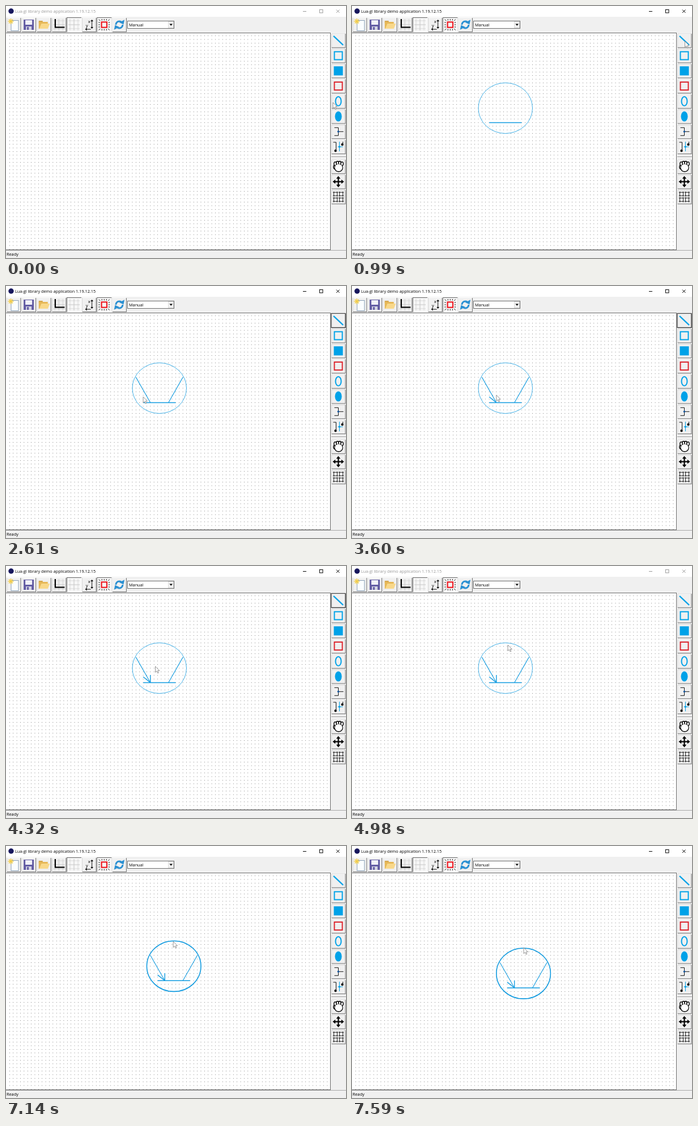
An HTML page with a canvas that plays this animation: 600x444 px, repeating every 7620 ms.

```html
<!DOCTYPE html>
<html lang="en">
<head>
<meta charset="utf-8">
<title>Drawing demo</title>
<style>
html, body { margin: 0; width: 100%; height: 100%; overflow: hidden; background: #fff; }
canvas { display: block; }
</style>
</head>
<body>
<canvas id="stage" width="600" height="444"></canvas>
<script>
const W = 600, H = 444, LOOP = 7620, GRID = 6.37, TOP = 46.2, DRAG = 200;
const BLUE = '#00a2e8', INK = '#119be0', RED = '#dc262e', FACE = '#f0f0f0', DARK = '#6c6c6c';
const view = document.getElementById('stage').getContext('2d');
let c = view;

const gridX = n => n * GRID;
const gridY = n => TOP + n * GRID;

function box(x, y, w, h, fill) {
  c.fillStyle = fill;
  c.fillRect(x, y, w, h);
}

// Square outline given by its centre and half side
function square(x, y, r, color, width) {
  c.strokeStyle = color;
  c.lineWidth = width;
  c.strokeRect(x - r, y - r, 2 * r, 2 * r);
}

function line(x0, y0, x1, y1, color = '#111', width = 1) {
  c.beginPath();
  c.moveTo(x0, y0);
  c.lineTo(x1, y1);
  c.strokeStyle = color;
  c.lineWidth = width;
  c.stroke();
}

function oval(x, y, rx, ry, fill, color, width = 1) {
  c.beginPath();
  c.ellipse(x, y, rx, ry, 0, 0, 7);
  if (fill) { c.fillStyle = fill; c.fill(); }
  if (color) { c.strokeStyle = color; c.lineWidth = width; c.stroke(); }
}

const dot = (x, y, r, fill = '#111') => oval(x, y, r, r, fill);

// Arrow head with its tip at x, y
function head(x, y, angle, size, fill = '#000') {
  at(x, y, () => {
    c.rotate(angle);
    c.beginPath();
    c.moveTo(0, 0);
    c.lineTo(-size, -size * .8);
    c.lineTo(-size, size * .8);
    c.fillStyle = fill;
    c.fill();
  });
}

function text(s, x, y, color = '#000', size = 7.3) {
  c.font = `${size}px "Open Sans", "Noto Sans", sans-serif`;
  c.fillStyle = color;
  c.fillText(s, x, y);
}

function at(x, y, draw) {
  c.save();
  c.translate(x, y);
  draw();
  c.restore();
}

function turns(n, draw) {
  for (let i = 0; i < n; i++) {
    draw();
    c.rotate(2 * Math.PI / n);
  }
}

function button(down) {
  box(-13, -13, 26, 26, down ? DARK : '#fff');
  box(-12, -12, 25, 25, down ? '#fff' : DARK);
  box(-12, -12, 24, 24, down ? '#f7f7f7' : FACE);
}

const lattice = () => turns(4, () => {
  for (const p of [0, 7]) line(p, -10, p, 10, '#ccc', .7);
});

const topIcons = [
  () => {
    box(-5, -8, 14, 19, '#8a9fb5');
    box(-4, -7, 12, 17, '#fafdff');
    at(-5, -6, () => turns(8, () => line(0, 0, 0, -5, '#f2cd48', 1.5)));
  },
  () => {
    box(-9, -9, 18, 18, '#625ca4');
    box(-6, -8, 12, 8, '#f0f0f8');
    box(-5, 3, 10, 6, '#d4d4e4');
    box(-3, 4, 3, 5, '#625ca4');
  },
  () => {
    box(-9, -7, 7, 4, '#d5a64c');
    box(-9, -5, 16, 12, '#e6b857');
    at(-8, 7, () => {
      c.transform(1, 0, -.4, 1, 0, 0);
      box(0, -9, 15, 9, '#f8d88a');
    });
  },
  () => {
    lattice();
    line(-6.5, -10, -6.5, 5.5, '#000', 2.2);
    line(-6.5, 4.5, 10, 4.5, '#000', 2.2);
  },
  lattice,
  () => {
    text('x', -2, -3, '#000', 8);
    text('y', -6, 4, '#000', 8);
    line(5, -7, 5, 5);
    head(5, -9, -Math.PI / 2, 3);
    head(5, 7, Math.PI / 2, 3);
    line(-4, 8, 3, 8);
    head(-7, 8, Math.PI, 3);
  },
  () => {
    square(0, 0, 4.7, '#ed1c24', 2.2);
    turns(4, () => {
      for (const p of [-4, 0, 4]) line(p, -10, p, -7.5);
      line(-9.5, -9.5, -7, -7);
    });
  },
  () => turns(2, () => {
    c.beginPath();
    c.arc(0, 0, 6, Math.PI, Math.PI * 1.7);
    c.strokeStyle = '#2b90d2';
    c.lineWidth = 3;
    c.stroke();
    head(7.5, -.5, 1.1, 6.5, '#2b90d2');
  })
];

const sideIcons = [
  () => line(-8.5, -8, 8.5, 8, BLUE, 2.3),
  () => square(0, 0, 7, BLUE, 2),
  () => box(-8, -8, 16, 16, BLUE),
  () => square(0, 0, 7, RED, 2),
  () => oval(0, 0, 5, 8, null, BLUE, 2),
  () => oval(0, 0, 6, 9, BLUE),
  () => {
    for (const y of [-7, 7]) line(-7, y, 0, y);
    line(0, -7, 0, 7);
    line(0, 0, 9, 0);
    dot(0, 0, 1.8, '#16579c');
  },
  () => {
    line(-9, -8, -4, -8);
    line(-4, -8, -4, 7);
    dot(-5, 7, 2.2);
    line(2, -9, 2, 8, BLUE);
    line(-1, 0, 8, 0, BLUE);
    dot(2, 0, 1.7, BLUE);
    line(8, -9, 8, -4);
    dot(7, -4, 2.2);
  },
  () => {
    oval(-6, 1, 2.5, 3.5, '#fff', '#000', 1.4);
    for (let i = 0; i < 4; i++)
      oval(i * 4 - 5.5, -4 - Math.sin((i + .5) * Math.PI / 4) * 2, 2.2, 3.4, '#fff', '#000', 1.4);
    oval(.5, 2.5, 7, 6.5, null, '#000', 1.4);
    oval(.5, 1.8, 6.5, 6.2, '#fff');
  },
  () => turns(4, () => {
    line(0, 0, 0, -7, '#000', 2.2);
    head(0, -10, -Math.PI / 2, 4.7);
  }),
  () => turns(4, () => {
    square(5, 5, 3, '#333', 1);
    at(5, 5, () => turns(4, () => dot(3, 3, 1.4, '#444')));
  })
];

const sideY = i => 60.8 + i * 26.75 + (i > 7 ? 8 : 0);

function drawWindow() {
  box(0, 0, W, H, FACE);
  box(0, 0, W, 19, '#fff');
  dot(9, 9, 4.7, '#17175c');
  topIcons.forEach((icon, i) => at(13.5 + i * 26.63, 33, () => {
    button(i === 4 || i === 6);
    icon();
  }));
  box(214, 26, 83, 14, DARK);
  box(215, 27, 81, 12, '#fff');
  box(286, 27, 10, 12, '#ddd');
  box(287, 28, 8, 10, FACE);
  head(291.2, 34.8, Math.PI / 2, 3.4);
  text('Manual', 217, 36);

  box(0, 47, 573, 383, DARK);
  box(0, 48, 572, 381, '#fff');
  for (let i = 1; i < 90; i++)
    for (let j = 1; j <= 60; j++) box(gridX(i) - .35, gridY(j) - .35, .7, .7, '#000');
  sideIcons.forEach((icon, i) => at(586.5, sideY(i), () => {
    button();
    icon();
  }));
  box(574, 265, 26, 1, '#a0a0a0');
  box(0, 430, W, 1, '#a8a8a8');
  text('Ready', 1, 439.5);
}

const backdrop = document.createElement('canvas');
backdrop.width = W;
backdrop.height = H;
c = backdrop.getContext('2d');
drawWindow();
c = view;

// Each shape: start time and both ends in grid steps; the first is the ellipse
const shapes = [
  { t: 220, from: [35, 14], to: [50, 28], width: .8 },
  { t: 660, from: [38, 25], to: [47, 25], width: 1.4 },
  { t: 1180, from: [36, 18], to: [40, 25] },
  { t: 1950, from: [45, 25], to: [49, 18] },
  { t: 2680, from: [38, 23.4], to: [40, 25], width: 1.4 },
  { t: 3640, from: [40, 22.9], to: [40, 25], width: 1.4 }
];
const GRAB = { t: 6600, x: 271, y: 135 };

// The pointer fetches a tool, goes to the start, waits a little and drags
const path = [];
const visit = (t, x, y) => path.push({ t, x, y });
let free = 0;
visit(0, 577, 170);
for (const { t, from, to } of shapes) {
  const gap = t - free;
  if (free) visit(free + gap * .4, 588, 62);
  for (const time of [free + gap * .85, t]) visit(time, gridX(from[0]), gridY(from[1]));
  free = t + DRAG;
  visit(free, gridX(to[0]), gridY(to[1]));
}
visit(4900, 275, 139);
visit(5900, 275, 139);
visit(6360, 266, 144);
visit(GRAB.t, GRAB.x, GRAB.y);
visit(7400, 303, 179);
visit(LOOP, 303, 179);

function pointer(t) {
  const i = path.findIndex(p => p.t > t), a = path[i - 1], b = path[i];
  const u = (t - a.t) / (b.t - a.t), k = u * u * (3 - 2 * u);
  return [a.x + (b.x - a.x) * k, a.y + (b.y - a.y) * k];
}

function titleBar(t) {
  const idle = t < 60 || (t > 4500 && t < 5400);
  const ink = idle ? '#999' : '#000';
  text('Lua-gl library demo application 1.19.12.15', 16, 12, ink);
  line(524, 9.5, 530, 9.5, ink);
  square(556.2, 9.2, 2.8, ink, 1);
  line(583, 6.5, 588.5, 12, ink);
  line(588.5, 6.5, 583, 12, ink);
}

function drawing(t, px, py) {
  const steps = d => Math.round(d / GRID);
  const moved = t > GRAB.t;
  c.save();
  if (moved) c.translate(steps(px - GRAB.x) * GRID, steps(py - GRAB.y) * GRID);
  shapes.forEach((s, i) => {
    if (t < s.t) return;
    const [x0, y0] = s.from;
    const [x1, y1] = t < s.t + DRAG ? [steps(px), steps(py - TOP)] : s.to;
    if (i) line(gridX(x0), gridY(y0), gridX(x1), gridY(y1), INK, s.width || 1.1);
    else oval(gridX((x0 + x1) / 2), gridY((y0 + y1) / 2), Math.abs(x1 - x0) * GRID / 2,
      Math.abs(y1 - y0) * GRID / 2, null, INK, moved ? 1.6 : s.width);
  });
  c.restore();
}

function cursor() {
  c.beginPath();
  c.moveTo(0, 0);
  c.lineTo(0, 10.5);
  c.lineTo(2.5, 8.3);
  c.lineTo(4.2, 12);
  c.lineTo(5.8, 11.3);
  c.lineTo(4.2, 7.6);
  c.lineTo(7.4, 7.6);
  c.closePath();
  c.fillStyle = '#fff';
  c.fill();
  c.strokeStyle = '#888';
  c.lineWidth = .9;
  c.stroke();
}

function render(t) {
  c.drawImage(backdrop, 0, 0);
  titleBar(t);
  const [px, py] = pointer(t);
  if (t > 1020 && t < 4500) square(586.5, sideY(0), 12.5, '#222', 1);
  drawing(t, px, py);
  at(px, py, cursor);
}

const start = performance.now();
(function tick() {
  render((performance.now() - start) % LOOP);
  requestAnimationFrame(tick);
})();
</script>
</body>
</html>
```
